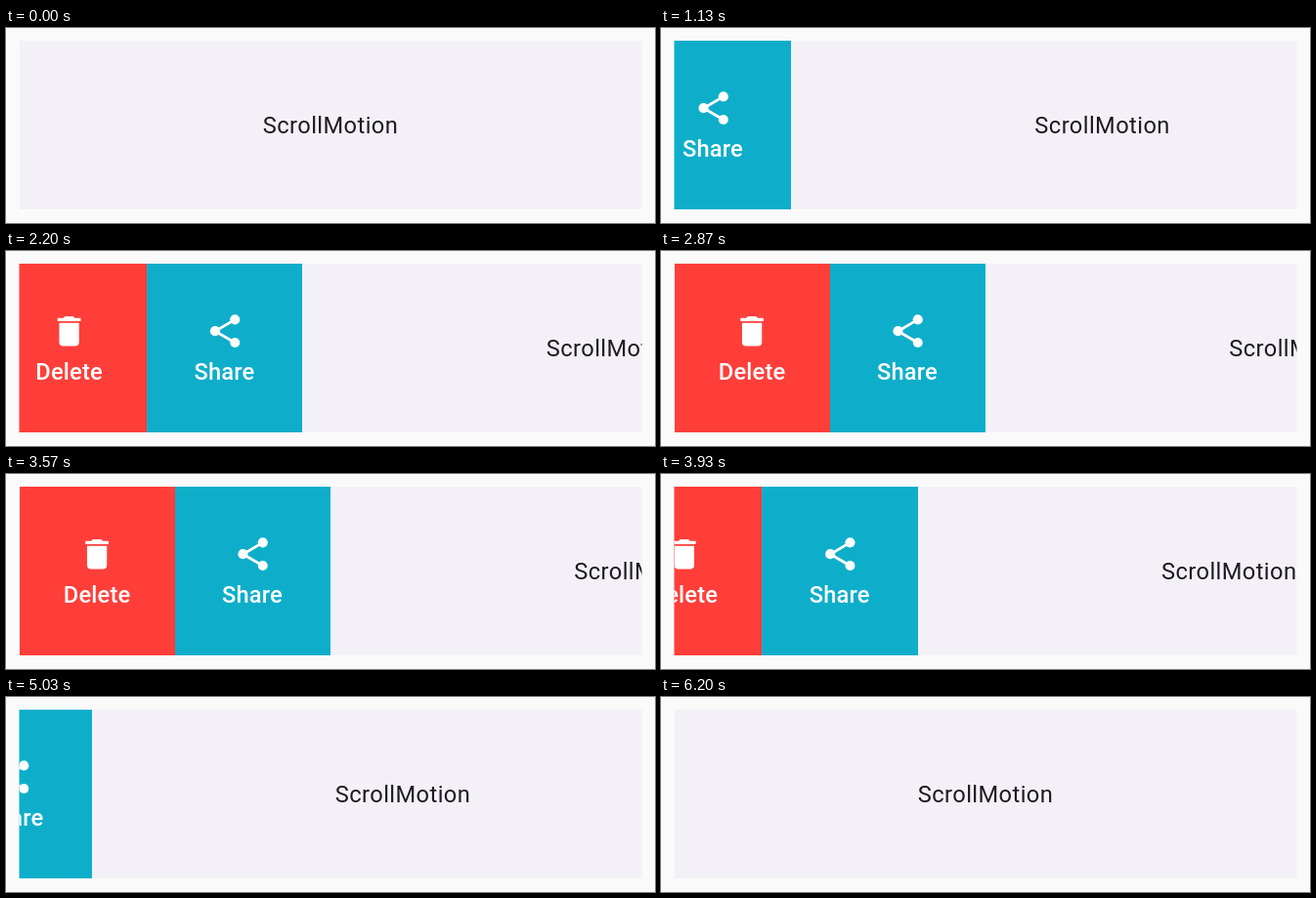
Recreate the animation shown at these times as an HTML page. Size 664 by 200 pixels, loop 6.63 s.

```html
<!DOCTYPE html>
<html lang="en">
<head>
<meta charset="utf-8">
<title>Slide actions</title>
<style>
  html, body { margin: 0; width: 100%; height: 100%; overflow: hidden; background: #fafafa; }
  svg { display: block; width: 664px; height: 200px; }
  text { font: 400 23.67px Roboto, sans-serif; text-anchor: middle; }
  .title { fill: #1d1b20; letter-spacing: .42px; }
  .label { fill: #fff; font-weight: 500; letter-spacing: .17px; }
  rect { shape-rendering: crispEdges; }
</style>
</head>
<body>
<svg viewBox="0 0 664 200">
  <defs>
    <clipPath id="card"><rect x="13.5" y="13" width="637" height="173"/></clipPath>
  </defs>
  <g clip-path="url(#card)">
    <rect x="13.5" y="13" width="637" height="173" fill="#f3f1f7"/>
    <text id="title" class="title" x="332" y="108">ScrollMotion</text>
    <g id="actions">
      <rect x="13.5" y="13" width="159.5" height="173" fill="#ff3e3a"/>
      <rect x="172.75" y="13" width="159.25" height="173" fill="#0eaeca"/>
      <g fill="#fff" transform="translate(72.8 61.9) scale(1.691)">
        <path d="M6 19c0 1.1.9 2 2 2h8c1.1 0 2-.9 2-2V7H6zM19 4h-3.5l-1-1h-5l-1 1H5v2h14z"/>
      </g>
      <g fill="#fff" transform="translate(232.3 61.9) scale(1.691)">
        <path d="M18 5L6 12l12 7" fill="none" stroke="#fff" stroke-width="1.65"/>
        <circle cx="18" cy="5" r="3"/>
        <circle cx="6" cy="12" r="3"/>
        <circle cx="18" cy="19" r="2.95"/>
      </g>
      <text class="label" x="93.1" y="132.3">Delete</text>
      <text class="label" x="251.9" y="132.3">Share</text>
    </g>
  </g>
</svg>
<script>
  const LOOP = 6630;
  const EXTENT = 318.5;
  const DRAG = 2000;
  const SLOP = 30;
  const OPEN_AT = 380, CLOSE_AT = 3496;
  const title = document.getElementById('title');
  const actions = document.getElementById('actions');

  // The pane ignores a drag until it passes the slop, then catches up with the finger.
  function dragged(elapsed) {
    const distance = Math.min(EXTENT, Math.max(0, elapsed / DRAG * EXTENT));
    return distance < SLOP ? 0 : distance;
  }

  function render(t) {
    const offset = dragged(t - OPEN_AT) - dragged(t - CLOSE_AT);
    title.setAttribute('transform', `translate(${offset} 0)`);
    actions.setAttribute('transform', `translate(${offset - EXTENT} 0)`);
    actions.setAttribute('visibility', offset > 0 ? 'visible' : 'hidden');
  }

  const start = performance.now();
  function tick() {
    render((performance.now() - start) % LOOP);
    requestAnimationFrame(tick);
  }
  tick();
</script>
</body>
</html>
```
